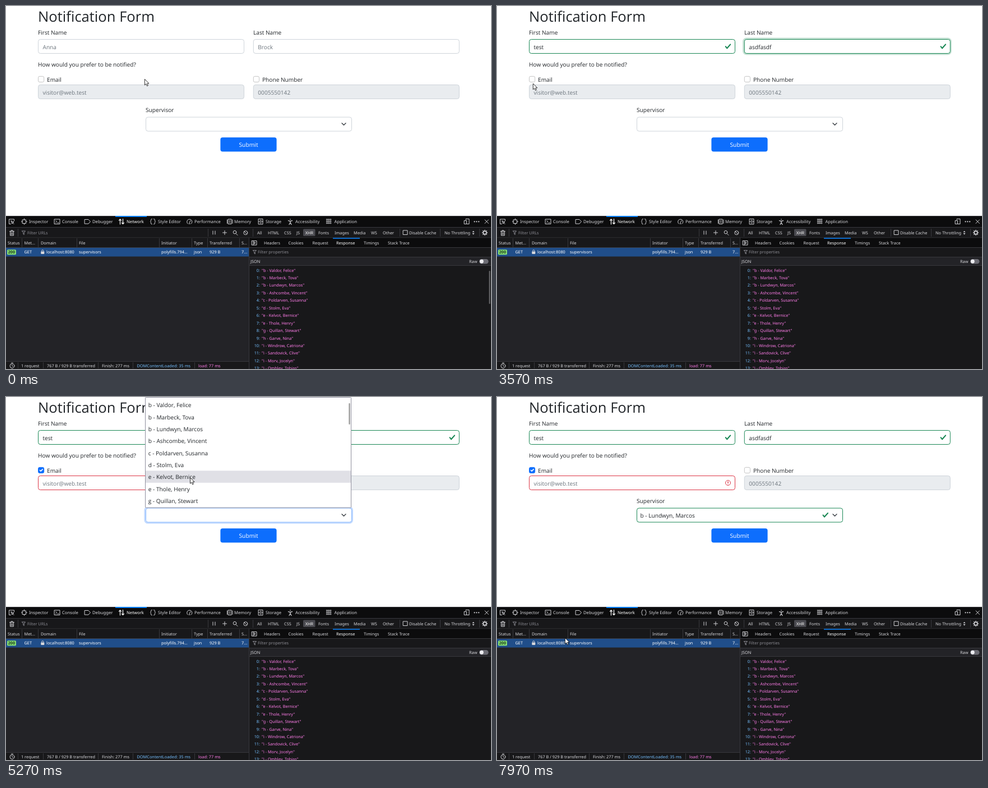
An HTML page that plays this animation: 865x647 px, repeating every 8000 ms.

```html
<!DOCTYPE html>
<html lang="en">
<head>
<meta charset="utf-8">
<title>Notification Form</title>
<style>
  html, body { margin: 0; width: 100%; height: 100%; overflow: hidden; background: #fff; }
  svg { display: block; text-rendering: geometricPrecision; }
  text { white-space: pre; }
  .form { font-family: "Open Sans", "Noto Sans", sans-serif; }
  .tools { font-family: "Noto Sans", "Open Sans", sans-serif; }
  .icon { fill: none; stroke: #d0d0d4; stroke-width: 1; stroke-linecap: round; stroke-linejoin: round; }
</style>
</head>
<body>
<svg id="stage" width="865" height="647" viewBox="0 0 865 647"></svg>
<script>
const INK = '#212529', HINT = '#6c757d', PALE = '#d7d7db', DIM = '#8a8a92', LINE = '#38383d';
const LOOP = 8000;
const people = ['b - Valdor, Felice', 'b - Marbeck, Tova', 'b - Lundwyn, Marcos', 'b - Ashcombe, Vincent',
  'c - Poldarven, Susanna', 'd - Stolm, Eva', 'e - Kelvot, Bernice', 'e - Thole, Henry', 'g - Quillan, Stewart',
  'h - Garve, Nina', 'i - Windrow, Catriona', 'i - Sandovick, Clive', 'i - Morv, Jocelyn', 'i - Ombley, Tobias'];
const chosen = people[2];

// Markup helpers
const text = (x, y, s, fill = INK, size = 10.15, extra = '') =>
  `<text x="${x}" y="${y}" fill="${fill}" font-size="${size}" ${extra}>${s}</text>`;
const rect = (x, y, w, h, fill, extra = '') =>
  `<rect x="${x}" y="${y}" width="${w}" height="${h}" fill="${fill}" ${extra}/>`;
const icon = (d, extra = '') => `<path class="icon" d="${d}" ${extra}/>`;
const tool = (x, y, s, fill = PALE, size = 7.35) => text(x, y, s, fill, size);
const vlines = (xs, y, h) => xs.map(x => rect(x, y, 1, h, LINE)).join('');

const tick = (id, x, y) => `<path id="${id}" transform="translate(${x} ${y}) scale(1.5)" fill="#198754"
  d="M2.3 6.73.6 4.53c-.4-1.04.46-1.4 1.1-.8l1.1 1.4 3.4-3.8c.6-.63 1.6-.27 1.2.7l-4 4.6c-.43.5-.8.4-1.1.1z"/>`;

const field = (id, x, y, fill = '#fff') =>
  rect(x - 1.3, y - 1.3, 370, 28, 'none', `id="${id}Ring" rx="5.3" stroke-width="2.7"`) +
  rect(x + .5, y + .3, 367, 25, fill, `id="${id}" rx="3.8" stroke-width="1"`) +
  text(x + 8.5, y + 17.5, '', HINT, 10.15, `id="${id}Text"`);

const checkbox = (id, x) =>
  rect(x - .9, 124, 13, 13, 'none', `id="${id}Ring" rx="3.8" stroke="#0d6efd" stroke-opacity="0" stroke-width="2.4"`) +
  rect(x + .5, 125.4, 10.2, 10.2, '#fff', `id="${id}" rx="2.4" stroke="#bfbfbf" stroke-width=".9"`);

function formMarkup() {
  return `<g class="form">` +
    text(57, 28, 'Notification Form', INK, 25.6) +
    text(57, 50.5, 'First Name') + text(441, 50.5, 'Last Name') +
    text(57, 108, 'How would you prefer to be notified?') +
    text(73, 135.3, 'Email') + text(457, 135.3, 'Phone Number') + text(249, 189, 'Supervisor') +
    field('first', 57, 59.2) + field('last', 440.8, 59.2) +
    field('email', 57, 140.2, '#e9ecef') + field('phone', 440.8, 140.2, '#e9ecef') + field('boss', 249, 197.8) +
    checkbox('useEmail', 57) + checkbox('usePhone', 440.8) +
    `<path id="useEmailTick" transform="translate(57.2 125.2) scale(.533)" d="m6 10 3 3 6-6" fill="none"
      stroke="#fff" stroke-width="3" stroke-linecap="round" stroke-linejoin="round"/>` +
    tick('firstTick', 406, 66) + tick('lastTick', 789.8, 66) + tick('bossTick', 579.8, 204.4) +
    `<g id="emailAlert" transform="translate(406 147)" stroke="#dc3545" fill="none">
      <circle cx="6" cy="6" r="4.5"/><path stroke-linejoin="round" d="M5.8 3.6h.4L6 6.5z"/>
      <circle cx="6" cy="8.2" r=".6" fill="#dc3545" stroke="none"/></g>` +
    `<path d="M599 208.7l3.5 3.5 3.5-3.5" fill="none" stroke="#343a40" stroke-width="1.3" stroke-linecap="round" stroke-linejoin="round"/>` +
    rect(382.4, 234.2, 100.2, 25.4, '#0d6efd', 'id="submit" rx="4"') +
    text(432.5, 251.4, 'Submit', '#fff', 10.3, 'text-anchor="middle"') +
    rect(0, 65.5, .9, 14, '#000', 'id="caret"') +
    `<g id="popup">` + rect(248.5, .5, 367, 196.7, '#fff', 'stroke="#8f8f9d" rx="1"') +
    rect(249, 0, 366, 21.4, '#e0e0e6', 'id="hover"') +
    people.slice(0, 9).map((p, i) => text(253.7, 18.2 + 21.35 * i, p)).join('') +
    rect(611.5, 11, 2, 38, '#8a8a8a', 'rx="1"') + `</g></g>`;
}

function tabIcons() {
  const grid = [0, 1, 2].map(r => [0, 1, 2].map(c =>
    `M${571.8 + c * 3.2} ${379.8 + r * 3.2}h1.6v1.6h-1.6z`).join('')).join('');
  return icon('M14.5 383v-3h-9v8.5h3M9 383l5 2-2 1 2 2.5M9 383l2 5 1-2') +
    icon('M29.5 381h6v6.5h-6zM32.5 379v2M32.5 387.5v2M27.5 384.2h2M35.5 384.2h2') +
    icon('M86.5 380h9.5v8.5h-9.5zM88.7 382.5l2 1.8-2 1.8M92 386.3h2') +
    icon('M140.5 380.5h6.5l3.5 3.8-3.5 3.8h-6.5z') +
    icon('M203.5 389v-9l-2 2.2M203.5 380l2 2.2M208.5 379.5v9l-2-2.2M208.5 388.5l2-2.2', 'style="stroke:#fff;stroke-width:1.2"') +
    icon('M260.5 379.5q-2 0-2 2v1.5l-1 1.2 1 1.3v1.5q0 2 2 2M263.5 379.5q2 0 2 2v1.5l1 1.2-1 1.3v1.5q0 2-2 2') +
    icon('M324 388a4.6 4.6 0 1 1 6.5 0M327 386.5l2-4M326 388h2.5') +
    icon('M396.5 380h5.5v8.5h-5.5zM394.5 381v6.5M404 381v6.5M399 382v4.5') +
    icon('M450.5 379.5h7.5v9.5h-7.5zM450.5 384.2h7.5M453 382h2.5M453 386.7h2.5') +
    icon('M503.5 382.5l3.5 1 3.5-1M507 383.5v2.5l-2 3.5M507 386l2 3.5M507 380v.6', 'style="stroke-width:1.3"') +
    icon(grid, 'style="stroke-width:.8"') +
    icon('M820 381v-1.5h6v9h-4M817.5 382.5h4v6h-4z') +
    icon('M835.5 384.3h.1M839.3 384.3h.1M843.1 384.3h.1', 'style="stroke-width:2.2"') +
    icon('M854 381l6.5 6.5M860.5 381l-6.5 6.5');
}

function barIcons() {
  const teeth = [...Array(8)].map((_, i) => {
    const c = Math.cos(i * Math.PI / 4), s = Math.sin(i * Math.PI / 4);
    return `M${854 + 3 * c} ${404 + 3 * s}L${854 + 4.5 * c} ${404 + 4.5 * s}`;
  }).join('');
  const funnel = (x, y) => icon(`M${x} ${y}h6l-2.3 3v3.5l-1.4-1v-2.5z`, `style="stroke:${DIM}"`);
  return icon('M6.5 401.5h8M9 401.5v-1.5h3v1.5M7.5 402v7h6v-7M9.5 403.5v4M11.5 403.5v4') +
    funnel(28.5, 401) + funnel(440.5, 435.5) +
    icon('M369 401v6M373 401v6M386.5 404h7M390 400.5v7M410 405.5l3 3') +
    `<circle class="icon" cx="408" cy="403.2" r="2.8"/><circle class="icon" cx="427.3" cy="404.2" r="3.5"/>` +
    icon('M425 402l4.6 4.5M708.5 400h7.5v7.5h-7.5z') +
    `<path fill="${PALE}" d="M831.5 403.3l2-2.5 2 2.5zM831.5 405l2 2.5 2-2.5z"/>` +
    `<circle class="icon" cx="854" cy="404" r="2.8" style="stroke-width:1.4"/>` + icon(teeth, 'style="stroke-width:1.5"') +
    icon('M438.5 418.5h8.5v7.5h-8.5zM441 418.5v7.5M443 420.5l2 1.7-2 1.7z') +
    `<rect x="62.3" y="437.5" width="6" height="4.5" rx=".7" fill="${PALE}"/>` + icon('M63.7 437.5v-1.2a1.6 1.6 0 0 1 3.2 0v1.2') +
    `<circle class="icon" cx="11" cy="641.5" r="4"/>` + icon('M11 639.5v2l1.5 1M9.5 636h3', 'style="stroke-width:.9"');
}

function toolsMarkup() {
  const row = (y, items, fill, size) => items.map(([x, s, c]) => tool(x, y, s, c || fill, size)).join('');
  return `<g class="tools">` + rect(0, 374, 865, 273, '#0c0c0d') + rect(0, 374, 865, 1, LINE) +
    rect(195, 374, 56, 2, '#0a84ff') + rect(0, 394, 865, 19, '#18181a') +
    rect(0, 394, 865, 1, LINE) + rect(0, 412.5, 865, 1, LINE) +
    row(387.2, [[41, 'Inspector'], [100, 'Console'], [154, 'Debugger'], [215, 'Network', '#fff'], [271, 'Style Editor'],
      [336, 'Performance'], [407, 'Memory'], [463, 'Storage'], [516, 'Accessibility'], [585.5, 'Application']], PALE, 7.7) +
    vlines([21, 360, 440, 702, 774, 844], 397, 14) +
    rect(530, 397.5, 21.5, 12.5, '#4a4a50', 'rx="1.5"') +
    row(406.6, [[38, 'Filter URLs', DIM], [448, 'All'], [467, 'HTML'], [496, 'CSS'], [518, 'JS'], [533.8, 'XHR', '#fff'], [557, 'Fonts'],
      [586, 'Images'], [620, 'Media'], [651, 'WS'], [672, 'Other'], [719, 'Disable Cache'], [782, 'No Throttling']]) +
    // request list
    rect(0, 413.5, 433, 17, '#18181a') + rect(0, 430.5, 433, 202.5, '#232327') + rect(0, 430, 433, 1, LINE) +
    vlines([28, 57, 126, 273, 331, 359, 416], 414, 16) +
    row(425, [[3, 'Status'], [32.5, 'Met...'], [62, 'Domain'], [130, 'File'], [277, 'Initiator'], [335, 'Type'], [363, 'Transferred'], [420, 'S...']]) +
    rect(0, 431, 433, 15.5, '#204e8a') + rect(2, 434.3, 16, 9, '#86de74', 'rx="1.5"') +
    text(3.7, 441.3, '200', '#18381a', 7.2, 'font-weight="600"') +
    row(441.2, [[32.5, 'GET'], [72, 'localhost:8080'], [130, 'supervisors'], [277, 'polyfills.794...'], [335, 'json'], [363, '929 B'], [420, '7...']], '#fff') +
    rect(0, 633, 433, 14, '#18181a') + rect(0, 633, 433, 1, LINE) + vlines([21, 66, 164, 226, 336], 635, 11) +
    row(644, [[27, '1 request'], [73, '767 B / 929 B transferred'], [171, 'Finish: 277 ms'],
      [233.5, 'DOMContentLoaded: 35 ms', '#75bfff'], [343, 'load: 77 ms', '#ff7de9']]) +
    // response panel
    rect(433, 413, 1, 234, LINE) + rect(434, 413.5, 431, 17, '#0c0c0d') + rect(434, 430.5, 431, 216.5, '#18181a') +
    rect(583, 413.3, 48, 1.5, '#0a84ff') + rect(434, 430, 431, 1, LINE) +
    row(425, [[460, 'Headers'], [503.5, 'Cookies'], [546.5, 'Request'], [589, 'Response', '#fff'], [638, 'Timings'], [681, 'Stack Trace']]) +
    tool(449, 441.2, 'Filter properties', DIM) + rect(434, 447, 431, 16, '#232327') + rect(434, 447, 431, 1, LINE) + rect(434, 462, 431, 1, LINE) +
    tool(436, 458, 'JSON') + tool(826, 458, 'Raw') +
    rect(844, 451, 16.5, 8.5, '#6c6c74', 'rx="4.25"') + `<circle cx="848.3" cy="455.25" r="3.4" fill="#ececf0"/>` +
    people.map((p, i) => {
      const y = 473.5 + 13.45 * i;
      return text(453, y, i + ':', '#75bfff', 7.3, 'text-anchor="end"') + tool(456, y, `"${p}"`, '#ff7de9', 7.25);
    }).join('') + rect(861.5, 472, 2, 59, '#68686c', 'id="scrollbar" rx="1"') +
    tabIcons() + barIcons() + `</g>`;
}

stage.innerHTML = formMarkup() + toolsMarkup() +
  `<path id="arrow" fill="#fff" stroke="#000" stroke-width=".8" d="M.4.4V11L2.8 8.8 4.5 12.6 6.3 11.8 4.7 8.1H8Z"/>
   <path id="beam" fill="none" stroke="#222" d="M-2.5-5h2L0-4.5.5-5h2M0-4.5v9.5M-2.5 5.5h2L0 5 .5 5.5h2"/>`;
const $ = id => document.getElementById(id);
const set = (id, attrs) => { for (const k in attrs) $(id).setAttribute(k, attrs[k]); };
const show = (id, on) => set(id, { visibility: on ? 'visible' : 'hidden' });

// Field looks: border colour, ring colour, ring opacity
const look = {
  rest: [206, 212, 218, 13, 110, 253, 0],
  focus: [134, 183, 254, 13, 110, 253, .25],
  validFocus: [25, 135, 84, 25, 135, 84, .25],
  valid: [25, 135, 84, 25, 135, 84, 0],
  invalid: [220, 53, 69, 220, 53, 69, 0]
};
const fieldSteps = {
  first: [[370, 'focus'], [1030, 'validFocus'], [1450, 'valid']],
  last: [[1450, 'focus'], [1520, 'validFocus'], [3630, 'valid']],
  email: [[3630, 'invalid']],
  phone: [],
  boss: [[4500, 'focus'], [5780, 'validFocus'], [6400, 'valid']]
};
const path = [[0, 247, 130], [30, 247, 130], [350, 202, 70], [500, 198, 66], [1870, 198, 66], [2300, 250, 115],
  [2430, 251, 118], [2680, 251, 124], [3100, 150, 184], [3500, 65, 140], [3570, 64, 138], [3630, 61, 131], [3800, 61, 131],
  [4330, 316, 190], [4500, 318, 205], [4720, 317, 198], [5100, 317, 198], [5500, 343, 70], [5670, 345, 64], [5780, 345, 64],
  [5930, 350, 108], [6380, 400, 310], [6480, 408, 306], [6650, 422, 252], [6760, 422, 261], [6930, 418, 284],
  [7170, 418, 284], [7220, 416, 278], [7970, 121, 429], [LOOP, 121, 429]];

const mix = (a, b, k) => a.map((v, i) => v + (b[i] - v) * k);
const ease = k => { k = Math.max(0, Math.min(1, k)); return k * k * (3 - 2 * k); };
const rgb = c => `rgb(${c.slice(0, 3).map(Math.round)})`;
const typedCount = (t, start, gap, max) => Math.max(0, Math.min(max, Math.floor((t - start) / gap) + 1));

function pointer(t) {
  const i = path.findIndex(p => p[0] > t), a = path[i - 1], b = path[i];
  return mix(a, b, (t - a[0]) / (b[0] - a[0])).slice(1);
}

function drawField(id, t) {
  let c = look.rest;
  for (const [at, name] of fieldSteps[id]) if (t >= at) c = mix(c, look[name], ease((t - at) / 150));
  set(id, { stroke: rgb(c) });
  set(id + 'Ring', { stroke: rgb(c.slice(3)), 'stroke-opacity': c[6] });
}

function fillField(id, value, hint) {
  $(id + 'Text').textContent = value || hint;
  set(id + 'Text', { fill: value ? INK : HINT });
}

function drawCaret(t) {
  const inFirst = t < 1450, id = inFirst ? 'first' : 'last';
  const [focus, start, gap, max] = inFirst ? [370, 1030, 100, 4] : [1450, 1520, 54, 8];
  const n = typedCount(t, start, gap, max), since = n ? start + gap * (n - 1) : focus;
  const width = n ? $(id + 'Text').getComputedTextLength() : 0;
  set('caret', { x: +$(id + 'Text').getAttribute('x') + width + .3 });
  show('caret', t >= 370 && t < 3630 && (t - since) % 1000 < 500);
}

function draw(t) {
  const [x, y] = pointer(t), checked = t >= 3630, open = t >= 4500 && t < 5780, picked = t >= 5780;
  for (const id in fieldSteps) drawField(id, t);
  fillField('first', 'test'.slice(0, typedCount(t, 1030, 100, 4)), 'Anna');
  fillField('last', 'asdfasdf'.slice(0, typedCount(t, 1520, 54, 8)), 'Brock');
  fillField('email', '', 'visitor@web.test');
  fillField('phone', '', '0005550142');
  fillField('boss', picked ? chosen : '', '');
  set('bossText', { x: 255.5 });
  drawCaret(t);
  set('scrollbar', { opacity: 1 - ease((t - 1700) / 400) });

  show('firstTick', t >= 1030);
  show('lastTick', t >= 1520);
  show('bossTick', picked);
  show('emailAlert', checked);
  show('useEmailTick', checked);
  set('email', { fill: checked ? '#fff' : '#e9ecef' });
  set('useEmail', { fill: checked ? '#0d6efd' : '#fff', stroke: checked ? '#0d6efd' : '#bfbfbf' });
  set('useEmailRing', { 'stroke-opacity': .25 * (ease((t - 3630) / 150) - ease((t - 4500) / 150)) });

  const item = Math.floor((y - 3.3) / 21.35);
  show('popup', open);
  show('hover', open && t > 5100 && item < 9);
  set('hover', { y: 3.3 + 21.35 * item });

  const lit = ease((t - 6600) / 150) - ease((t - 6765) / 150);
  set('submit', { fill: rgb(mix([13, 110, 253], [11, 94, 215], lit)) });

  const inRow = (left, top) => x > left && x < left + 368 && y > top && y < top + 26;
  const typing = !open && (inRow(57, 59) || inRow(441, 59) || (checked && inRow(57, 140)));
  show('beam', typing);
  show('arrow', !typing);
  for (const id of ['arrow', 'beam']) set(id, { transform: `translate(${x} ${y})` });
}

const began = performance.now();
function frame() {
  draw((performance.now() - began) % LOOP);
  requestAnimationFrame(frame);
}
frame();
</script>
</body>
</html>
```
